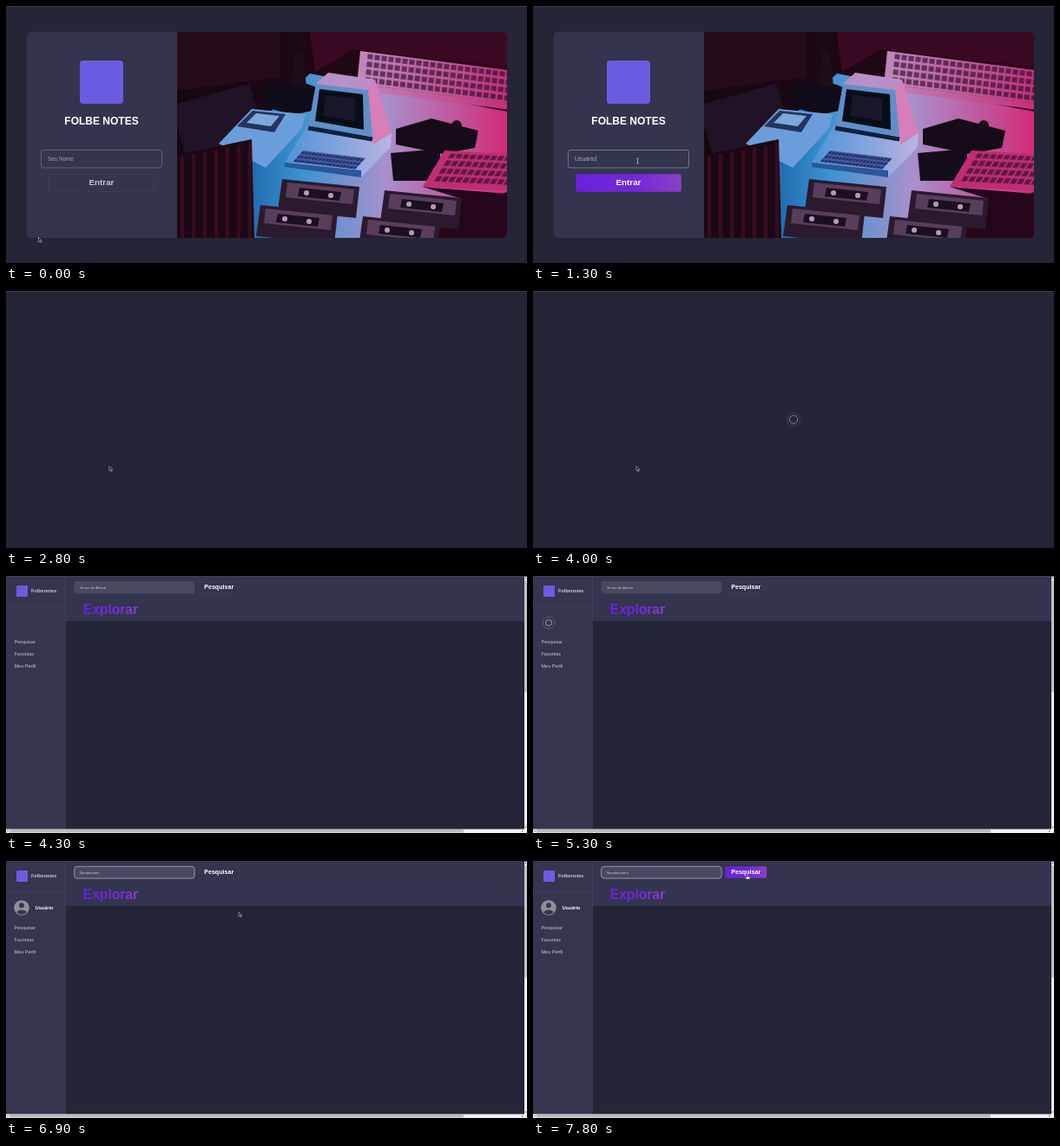
An HTML page for the animation above (8 s loop, 600 by 297 pixels).

```html
<!DOCTYPE html>
<html lang="pt">
<head>
<meta charset="utf-8">
<title>Folbenotes</title>
<style>
  html, body { margin: 0; width: 100%; height: 100%; overflow: hidden; background: #242536; }
  svg { display: block; width: 100%; height: 100%; }
  text { font-family: "Liberation Sans", Arial, sans-serif; fill: #fff; }
  .b { font-weight: bold; }
  .mid { text-anchor: middle; }
  .small { font-size: 5.5px; }
  .soft { fill: #c6c6d4; }
</style>
</head>
<body>
<svg viewBox="0 0 600 297">
  <defs>
    <linearGradient id="violet"><stop stop-color="#6a20dd"/><stop offset=".6" stop-color="#7529d8"/><stop offset="1" stop-color="#8a40c8"/></linearGradient>
    <linearGradient id="room"><stop stop-color="#14080f"/><stop offset="1" stop-color="#2c0619"/></linearGradient>
    <linearGradient id="table"><stop stop-color="#0f4f94"/><stop offset=".3" stop-color="#3b93d2"/><stop offset=".58" stop-color="#a791cc"/><stop offset="1" stop-color="#d32a7a"/></linearGradient>
    <linearGradient id="shell"><stop stop-color="#4c94d8"/><stop offset="1" stop-color="#b9b4e2"/></linearGradient>
    <linearGradient id="board"><stop stop-color="#c187bd"/><stop offset="1" stop-color="#c22d78"/></linearGradient>
    <pattern id="keys" width="8" height="9" patternUnits="userSpaceOnUse"><rect x="1" y="2" width="6" height="6" fill="#2a0d2c" fill-opacity=".65"/></pattern>
    <clipPath id="frame"><path d="M197 30H571a6 6 0 0 1 6 6V262a6 6 0 0 1-6 6H197z"/></clipPath>
    <g id="tape">
      <path d="M0 0L89 9L85 45L-5 36z" fill="#2b1a2e"/>
      <path d="M6 4L83 12L81 29L4 21z" fill="#5a3d5c"/>
      <path d="M20 10L68 15L66 25L18 20z" fill="#1a1020"/>
      <path d="M28 16h.1M56 19h.1" stroke="#b897b8" stroke-width="6" stroke-linecap="round"/>
    </g>
  </defs>
  <rect width="600" height="297" fill="#242536"/>

  <g id="login">
    <rect x="23.5" y="30" width="190" height="238" rx="6" fill="#33344e"/>
    <g clip-path="url(#frame)">
      <rect x="197" y="30" width="380" height="238" fill="url(#room)"/>
      <path d="M197 30H315V82L197 98z" fill="#260b1a"/>
      <path d="M350 30H577V70L400 50L356 76z" fill="#3a0a22"/>
      <path d="M240 184L350 78L577 122V215L425 268H285z" fill="url(#table)"/>
      <g transform="matrix(1 .13 -.1 1 408 52)">
        <rect width="180" height="45" fill="url(#board)"/>
        <rect x="8" y="2" width="170" height="36" fill="url(#keys)"/>
      </g>
      <g transform="matrix(1 -.28 .3 1 190 115)">
        <rect width="90" height="65" fill="#1b1622"/>
        <rect width="90" height="65" fill="url(#keys)"/>
      </g>
      <path d="M292 96L330 84L369 98L366 118L330 126L303 118z" fill="#110c19"/>
      <path d="M333 50H341L346 92H328z" fill="#1d0e18"/>
      <circle cx="337" cy="42" r="11" fill="#1b0a13"/>
      <g id="computer">
        <path d="M347 138L444 146L443 163L409 198L321 181z" fill="url(#shell)"/>
        <path d="M321 181L409 190V198L321 186z" fill="#27579c"/>
        <g transform="matrix(.5 .06 -.45 .5 342 167)">
          <rect width="144" height="26" fill="#3a64b4"/>
          <rect width="144" height="26" fill="url(#keys)"/>
        </g>
        <path d="M357 90L417 97L423 151L348 139z" fill="#5f8fc9"/>
        <path d="M357 90L371 77L425 85L417 97z" fill="#b98fc9"/>
        <path d="M417 97L425 85L444 147L423 160z" fill="#d67fb8"/>
        <path d="M361 96L411 102L412 143L356 133z" fill="#090d18"/>
        <path d="M368 103L402 107V133L365 127z" fill="#18182a"/>
        <path d="M348 141L422 154" stroke="#10203e" stroke-width="5"/>
      </g>
      <path d="M283 119L345 125L341 141L299 187L245 159z" fill="#6c9ddb"/>
      <path d="M284 121L322 125L309 146L266 139z" fill="#22345f"/>
      <path d="M288 124L315 127L305 139L277 135z" fill="#7fa8d8"/>
      <path d="M449 142L490 130L544 144L540 164L503 171L449 160z" fill="#150c18"/>
      <path d="M443 170L500 165V202H446z" fill="#150d1c"/>
      <circle cx="519" cy="138" r="6" fill="#1c0d18"/>
      <g transform="matrix(1 .05 -.6 1 505 167)">
        <rect width="110" height="42" fill="#c02d74"/>
        <rect x="8" y="3" width="100" height="34" fill="url(#keys)"/>
      </g>
      <path d="M480 209L577 217V268H520L522 222z" fill="#25061a"/>
      <path d="M197 172L283 154L286 268H197z" fill="#1c0813"/>
      <g id="stack" stroke="#380c22" stroke-width="4"></g>
      <g id="tapes"></g>
    </g>
    <rect x="85" y="63" width="50" height="50" rx="4" fill="#6a5ce0"/>
    <text class="b mid" x="110" y="137.3" font-size="12">FOLBE NOTES</text>
    <rect id="field" x="40.5" y="166.4" width="139" height="20.6" rx="2.5" fill="none" stroke-width=".8"/>
    <text id="name" x="48" y="179.2"></text>
    <rect id="caret" x="72.2" y="173" width=".5" height="7" fill="#b8b8c6"/>
    <g id="enter">
      <rect x="49.4" y="194.2" width="121.4" height="20.6" rx="2" stroke="#43445f" stroke-width=".7"/>
      <text class="b mid" x="110" y="207.4" font-size="9.8">Entrar</text>
    </g>
  </g>

  <g id="home">
    <rect width="68" height="293" fill="#34354e"/>
    <rect x="68" width="529" height="52" fill="#33344e"/>
    <path d="M68.3 0V292.5M0 35.2H68" stroke="#474860" stroke-width=".7"/>
    <rect x="12" y="11" width="13" height="13" rx="1" fill="#6a5ce0"/>
    <text class="b small soft" x="29" y="19.4">Folbenotes</text>
    <g id="user">
      <circle cx="18" cy="54" r="8.8" fill="#8f8f98"/>
      <circle cx="18" cy="51.2" r="3" fill="#34354e"/>
      <path d="M12.2 59.4a6.2 4.6 0 0 1 11.6 0a8 8 0 0 1-11.6 0z" fill="#34354e"/>
      <text class="b small" x="33.8" y="55.6">Usuário</text>
    </g>
    <g id="menu"></g>
    <rect id="query" x="78.6" y="6.3" width="138.6" height="13.8" rx="3.5" fill="#474863"/>
    <text id="artist" class="soft" x="85.3" y="14.7" font-size="4.2"></text>
    <rect id="find" x="221.3" y="6.3" width="47.8" height="13.4" rx="2.5" stroke-width=".6"/>
    <text class="b mid" x="245.2" y="15.3" font-size="7.1">Pesquisar</text>
    <text class="b" x="88.8" y="44" font-size="15.6" style="fill:url(#violet)">Explorar</text>
    <path d="M597 0H600V297H0V292.6H597z" fill="#f1f1f1"/>
    <path d="M597.3 5h2.5v129.5h-2.5zM4 293.1h523v3.4H4z" fill="#bcbcc0"/>
    <path d="M598.6 1.6l1 1.6h-2zM598.6 291l1-1.6h-2zM1 294.8l1.6-1v2zM595.6 294.8l-1.6-1v2z" fill="#555"/>
  </g>

  <g id="loader" fill="none" stroke="#c9cad8"><circle/><circle/></g>
  <rect width="600" height=".8" fill="#43445a"/>

  <g id="pointer">
    <path id="arrow" transform="translate(-2 -2)" d="M0 0V5.2L1.3 4.1 2.2 6 3.1 5.6 2.3 3.8H3.8z" fill="#15151f" stroke="#d4d4dc" stroke-width=".55"/>
    <path id="beam" d="M-1.3-2.8H1.3M0-2.8V2.8M-1.3 2.8H1.3" fill="none" stroke="#c4c4ce" stroke-width=".7"/>
    <path id="hand" d="M-.5-2.6h1V0l2.3.6-.2 2.3H-1L-2.6.6l.8-.4 1.3.8z" fill="#fff" stroke="#22222c" stroke-width=".4"/>
  </g>
</svg>

<script>
const LOOP = 8000, STEP = 100;
const LEAVE = 2800, HOME = 4300, LOADED = 5500;

const $ = id => document.getElementById(id);
const set = (el, attrs) => { for (const k in attrs) el.setAttribute(k, attrs[k]); };
const show = (el, on) => { el.style.display = on ? '' : 'none'; };
const progress = (t, from, to) => Math.max(0, Math.min(1, (t - from) / (to - from)));
const ease = p => p * p * (3 - 2 * p);

function add(parent, tag, attrs, text = '') {
  const el = document.createElementNS('http://www.w3.org/2000/svg', tag);
  set(el, attrs);
  el.textContent = text;
  $(parent).append(el);
}

function build() {
  for (let i = 0; i < 7; i++)
    add('stack', 'path', { d: `M${203 + i * 13} ${174 - i * 2.6}V268` });
  for (let row = 0; row < 2; row++)
    for (let col = 0; col < 2; col++)
      add('tapes', 'use', { href: '#tape', x: 318 + 118 * col - 25 * row, y: 200 + 13 * col + 30 * row });
  ['Pesquisar', 'Favoritas', 'Meu Perfil'].forEach((label, i) =>
    add('menu', 'text', { class: 'small soft', x: 9.5, y: 78 + 14 * i }, label));
}

const moves = [
  { from: 0, to: 500, x: 120.5, y: 179 },
  { from: 1700, to: 2200, x: 121, y: 204.5 },
  { from: HOME, to: 5400, x: 122, y: 136 },
  { from: 5400, to: 6000, x: 162.3, y: 12.5 },
  { from: 6400, to: 6700, x: 270, y: 61 },
  { from: 7100, to: 7700, x: 247, y: 18 }
];

function pointerAt(t) {
  let x = 39.5, y = 269.5;
  for (const m of moves) {
    const p = ease(progress(t, m.from, m.to));
    x += (m.x - x) * p;
    y += (m.y - y) * p;
  }
  return [x, y];
}

function drawLogin(t) {
  const focus = t >= 700 && t < 2500, typed = t >= 1300;
  set($('field'), { stroke: focus ? '#86878f' : '#6d6e86' });
  $('name').textContent = typed ? 'Usuário' : 'Seu Nome';
  $('name').style.fill = typed ? '#a9aabc' : '#9fa0b6';
  set($('name'), { 'font-size': typed ? 6.9 : 6.3 });
  show($('caret'), focus && typed && t % 1000 < 800);

  const scale = 1 + .1 * progress(t, 1900, 2200);
  const [box, label] = $('enter').children;
  set($('enter'), { transform: `translate(110 204.5) scale(${scale}) translate(-110 -204.5)` });
  set(box, { fill: typed ? 'url(#violet)' : 'none', 'stroke-opacity': typed ? 0 : 1 });
  label.style.fill = typed ? '#fff' : '#c3c4d2';
}

function drawHome(t) {
  const loaded = t >= LOADED, focus = t >= 6300, ready = t >= 7200;
  show($('user'), loaded);
  set($('menu'), { transform: `translate(0 ${loaded ? .7 : 0})` });
  set($('query'), { stroke: focus ? '#9fa0b2' : '#50516b', 'stroke-width': focus ? .9 : .4 });
  $('artist').textContent = ready ? 'Bandalumina' : t >= 6900 ? 'Bandalumin' : 'Nome do Artista';
  set($('find'), { fill: ready ? 'url(#violet)' : 'none', stroke: ready ? 'none' : '#3e3f59' });
}

// Two rings that grow and fade, half a period apart
function drawLoader(t, home) {
  const period = 1500, start = home ? HOME : LEAVE;
  show($('loader'), t >= LEAVE && t < LOADED);
  [...$('loader').children].forEach((ring, i) => {
    const age = Math.max(0, (t - start) / period - i / 2), p = age % 1;
    set(ring, {
      cx: home ? 18 : 300, cy: home ? 54 : 148.5,
      r: 8.5 * Math.sqrt(p), opacity: p ? (1 - p) * .8 : 0
    });
  });
}

function drawPointer(t) {
  const [x, y] = pointerAt(t);
  const beam = t >= 400 && t < 1900 || t >= 6000 && t < 6500;
  const hand = t >= 2000 && t < LEAVE || t >= 7500;
  set($('pointer'), { transform: `translate(${x} ${y})` });
  show($('pointer'), t < HOME || t >= LOADED);
  show($('beam'), beam);
  show($('hand'), hand);
  show($('arrow'), !beam && !hand);
}

function draw(now) {
  const t = Math.floor(now % LOOP / STEP) * STEP, home = t >= HOME;
  show($('login'), t < LEAVE);
  show($('home'), home);
  drawLogin(t);
  drawHome(t);
  drawLoader(t, home);
  drawPointer(t);
}

function tick() {
  draw(performance.now());
  requestAnimationFrame(tick);
}
build();
tick();
</script>
</body>
</html>
```
